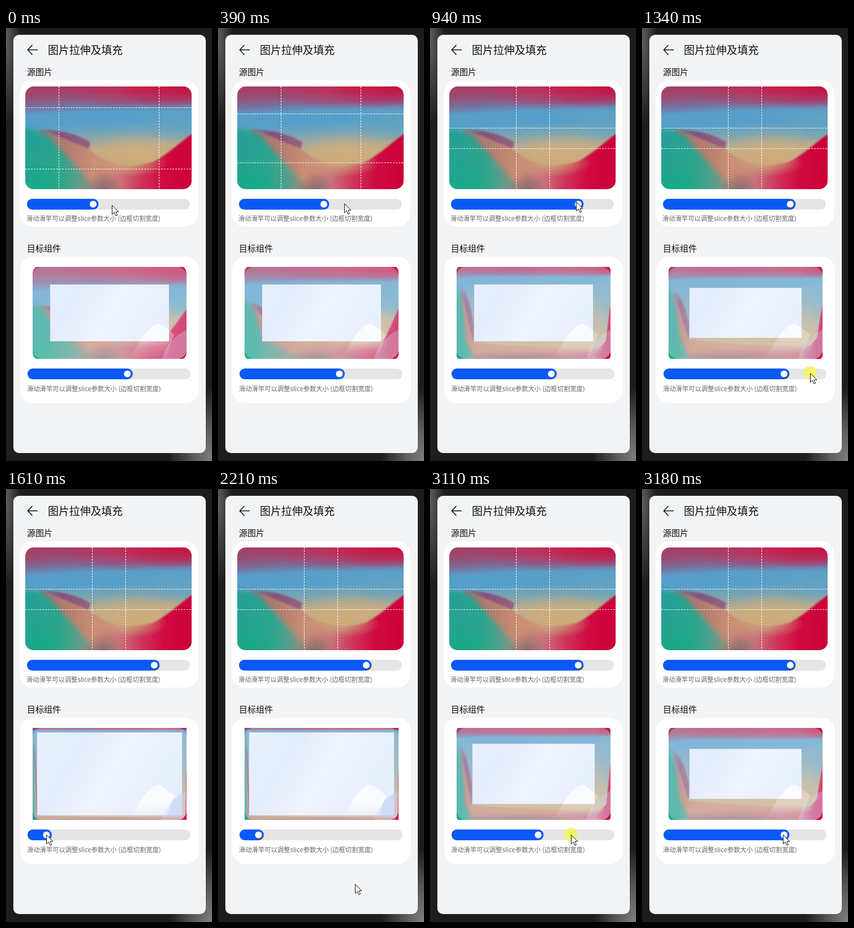
Write an HTML page with a canvas that moves like this. It is 364 by 763 pixels and loops after 3310 ms.

```html
<!DOCTYPE html>
<html lang="zh-CN">
<head>
<meta charset="utf-8">
<title>图片拉伸及填充</title>
<style>
html, body { margin: 0; width: 100%; height: 100%; overflow: hidden; }
body {
  position: relative;
  font-family: "Noto Sans CJK SC", "Noto Sans", sans-serif;
  background:
    radial-gradient(75px 130px at 100% 100%, #808080, #5a5a5a 45%, #1d1d1d00),
    radial-gradient(26px 150px at 0 25px, #606060, #1d1d1d00),
    #1d1d1d;
}
body > * { position: absolute; margin: 0; }
#screen { left: 13px; top: 12px; width: 340px; height: 737px; border-radius: 10px; background: #f1f3f5; }
.card { width: 316px; height: 258px; border-radius: 24px; background: #fff; }
p { line-height: 20px; white-space: nowrap; color: #111; }
.title { font-size: 18.9px; }
.head { font-size: 15px; font-weight: 500; }
.note { font-size: 11.3px; color: #666; }
canvas { left: 0; top: 0; }
</style>
</head>
<body>
<div id="screen"></div>
<div class="card" style="left:24px;top:92px"></div>
<div class="card" style="left:25px;top:403px"></div>
<p class="title" style="left:74px;top:28px">图片拉伸及填充</p>
<p class="head" style="left:37px;top:67px">源图片</p>
<p class="head" style="left:37px;top:378px">目标组件</p>
<p class="note" style="left:36px;top:325px">滑动滑竿可以调整slice参数大小 (边框切割宽度)</p>
<p class="note" style="left:37px;top:625px">滑动滑竿可以调整slice参数大小 (边框切割宽度)</p>
<canvas id="stage" width="364" height="763"></canvas>
<script>
const ctx = document.getElementById('stage').getContext('2d');
const LOOP = 3310, W = 294, H = 181;
const SRC = { x: 34, y: 103 };
const DST = { x: 47, y: 421, w: 272, h: 162 };

// The picture advances in bursts: start, end, number of steps.
const ticks = [0];
for (const [a, b, n] of [[60, 530, 7], [600, 720, 3], [880, 1340, 8], [1470, 1610, 3],
  [1940, 2420, 8], [2490, 2770, 5], [3040, 3180, 3]])
  for (let i = 0; i < n; i++) ticks.push(Math.floor((a + (b - a) * i / (n - 1)) / 10) * 10);

// Keyframes: time, value...
const topKnob = [[0, 154], [210, 187], [530, 187], [720, 224], [940, 262]];
const lowKnob = [[1200, 214.5], [1340, 251], [1610, 71.5], [2970, 71.5], [3180, 251]];
const pointer = [[0, 187, 312], [210, 187, 312], [530, 258, 306], [1010, 258, 306],
  [1270, 297, 608], [1340, 297, 608], [1610, 71, 609], [1870, 71, 609], [2150, 200, 690],
  [2280, 291, 704], [2420, 260, 650], [2770, 249, 609]];

function track(keys, t) {
  const i = keys.findIndex(k => k[0] > t);
  if (i < 0) return keys[keys.length - 1].slice(1);
  if (i === 0) return keys[0].slice(1);
  const a = keys[i - 1], b = keys[i], p = (t - a[0]) / (b[0] - a[0]);
  return a.slice(1).map((v, j) => v + (b[j + 1] - v) * p);
}

const within = (t, ...spans) => spans.some(([a, b]) => t >= a && t < b);

function gradient(c, box, stops) {
  const g = c.createLinearGradient(...box);
  stops.forEach(([at, color]) => g.addColorStop(at, color));
  return g;
}

function roundRect(c, x, y, w, h, r) {
  c.beginPath();
  c.roundRect(x, y, w, h, r);
}

function glow(c, x, y, rx, ry, color) {
  c.save();
  c.translate(x, y);
  c.scale(rx, ry);
  const g = c.createRadialGradient(0, 0, 0, 0, 0, 1);
  g.addColorStop(0, color);
  g.addColorStop(1, color + '00');
  c.fillStyle = g;
  c.fillRect(-1, -1, 2, 2);
  c.restore();
}

function paintArt() {
  const art = document.createElement('canvas');
  art.width = W;
  art.height = H;
  const c = art.getContext('2d');
  const shape = (path, fill, blur) => {
    c.filter = `blur(${blur}px)`;
    c.fillStyle = fill;
    c.fill(new Path2D(path));
    c.filter = 'none';
  };
  roundRect(c, 0, 0, W, H, 15);
  c.clip();

  // Sky
  c.fillStyle = gradient(c, [0, 0, 10, H], [[0, '#a83c64'], [.1, '#9c4a70'], [.2, '#7b6c9a'],
    [.28, '#579fc8'], [.4, '#579fc8'], [.52, '#7fa6b0'], [.66, '#bfab88'], [1, '#c9a878']]);
  c.fillRect(0, 0, W, H);
  glow(c, 200, 2, 150, 42, '#c42a55');
  glow(c, 290, 0, 130, 44, '#c8103f');
  glow(c, 290, 66, 95, 34, '#62a3c2');
  glow(c, 190, 118, 95, 36, '#cfae7c');

  // Fold and hills
  shape('M25 75C70 84 100 100 128 122C160 142 200 140 225 133C250 122 270 100 300 80V195H25Z',
    gradient(c, [35, 100, W, 115], [[0, '#a5716f'], [.18, '#b5806f'], [.34, '#c98d74'],
      [.52, '#c9737a'], [.68, '#cf2f58'], [.82, '#cf0a40'], [1, '#cc0038']]), 1.5);
  glow(c, 182, 134, 70, 26, '#ccaa7a');
  shape('M28 76C65 76 95 86 115 98L112 110C85 98 60 88 28 76Z',
    gradient(c, [28, 0, 115, 0], [[0, '#6f7f97'], [.4, '#84527e'], [1, '#95607f']]), 1.5);
  shape('M-15 75C20 74 32 78 46 92C66 118 98 146 140 200H-15Z',
    gradient(c, [0, 90, 130, 130], [[0, '#259f97'], [.5, '#2ba58c'], [.8, '#5c9d8b'], [1, '#8c8f80']]), 4);
  glow(c, 138, 185, 34, 34, '#806b70');
  glow(c, 15, 181, 90, 50, '#16ab88');
  return art;
}

const art = paintArt();

function drawSource(slice) {
  const { x, y } = SRC, dx = slice * W, dy = slice * H;
  ctx.drawImage(art, x, y);
  ctx.strokeStyle = '#fff';
  ctx.lineWidth = 1;
  ctx.setLineDash([3, 2]);
  ctx.beginPath();
  for (const px of [x + dx, x + W - dx]) {
    const v = Math.ceil(px) + .5;
    ctx.moveTo(v, y);
    ctx.lineTo(v, y + H);
  }
  for (const py of [y + dy, y + H - dy]) {
    const v = Math.ceil(py) + .5;
    ctx.moveTo(x, v);
    ctx.lineTo(x + W, v);
  }
  ctx.stroke();
  ctx.setLineDash([]);
}

const hill = new Path2D('M216 583Q230 564 240 546Q255 525 268 521Q274 521 298 541Q288 555 284 583Z');
const slope = new Path2D('M276 583Q285 548 319 532V583Z');

function drawPale(alpha) {
  const { x, y, w, h } = DST;
  ctx.save();
  ctx.clip();
  ctx.globalAlpha = alpha;
  ctx.fillStyle = gradient(ctx, [x, y, x + w, y + h], [[0, '#e9f0fd'], [.3, '#e4ecfc'],
    [.5, '#eff4fe'], [.75, '#e8f0fe'], [1, '#e4edfd']]);
  ctx.fillRect(x, y, w, h);
  ctx.fillStyle = '#d0ddfa';
  ctx.fill(slope);
  ctx.fillStyle = gradient(ctx, [0, 521, 0, 583], [[0, '#fafbfe'], [.5, '#fafbfe'], [1, '#f4f7fe00']]);
  ctx.fill(hill);
  ctx.restore();
}

function drawTarget(slice, border) {
  const { x, y, w, h } = DST, b = Math.round(border);
  const cuts = (size, edge) => [0, edge, size - edge, size];
  const sx = cuts(W, slice * W), sy = cuts(H, slice * H), tx = cuts(w, b), ty = cuts(h, b);
  for (let i = 0; i < 3; i++)
    for (let j = 0; j < 3; j++)
      if (i !== 1 || j !== 1)
        ctx.drawImage(art, sx[i], sy[j], sx[i + 1] - sx[i], sy[j + 1] - sy[j],
          x + tx[i], y + ty[j], tx[i + 1] - tx[i], ty[j + 1] - ty[j]);
  roundRect(ctx, x, y, w, h, 16);
  drawPale(.3);
  ctx.beginPath();
  ctx.rect(x + b, y + b, w - 2 * b, h - 2 * b);
  drawPale(1);
}

function drawSlider(x, y, knob, shaded) {
  ctx.fillStyle = '#e5e5e5';
  roundRect(ctx, x, y - 9.5, 288, 19, 9.5);
  ctx.fill();
  ctx.fillStyle = '#0a59f7';
  roundRect(ctx, x, y - 9.5, knob + 9.5 - x, 19, 9.5);
  ctx.fill();
  ctx.fillStyle = '#fff';
  ctx.beginPath();
  ctx.arc(knob, y, 6, 0, 7);
  ctx.fill();
  if (shaded) {
    ctx.strokeStyle = '#47505f';
    ctx.lineWidth = 2.5;
    ctx.beginPath();
    ctx.arc(knob, y, 7.5, .5, 1.8);
    ctx.stroke();
  }
}

const arrow = new Path2D('M.5 .5V16.5L4.3 13L7 19L9.6 17.8L7 12H12Z');
const back = new Path2D('M56 38.5H38.5M46.5 30L38.5 38.5L46.5 47');

function drawPointer([x, y], pressed) {
  if (pressed) {
    ctx.fillStyle = 'rgba(245,242,105,.95)';
    ctx.beginPath();
    ctx.arc(x, y, 12, 0, 7);
    ctx.fill();
  }
  ctx.save();
  ctx.translate(Math.round(x), Math.round(y));
  ctx.fillStyle = '#fff';
  ctx.fill(arrow);
  ctx.strokeStyle = '#111';
  ctx.lineWidth = 1;
  ctx.stroke(arrow);
  ctx.restore();
}

function draw(now) {
  const time = now % LOOP;
  const t = ticks.filter(v => v <= time).pop();
  const [top] = track(topKnob, t), [low] = track(lowKnob, t);
  const slice = .2 + (top - 154) * .2 / 108;
  ctx.clearRect(0, 0, 364, 763);
  ctx.strokeStyle = '#111';
  ctx.lineWidth = 1.5;
  ctx.stroke(back);
  drawSource(slice);
  drawTarget(slice, 8.3 + (low - 71) * .16);
  drawSlider(37, 310.5, top, within(t, [600, 880], [1010, LOOP]));
  drawSlider(38, 609.5, low, within(t, [1340, 1470], [1610, 3040]));
  drawPointer(track(pointer, t), within(t, [600, 880], [1340, 1470], [3040, 3180]));
  requestAnimationFrame(draw);
}
requestAnimationFrame(draw);
</script>
</body>
</html>
```
